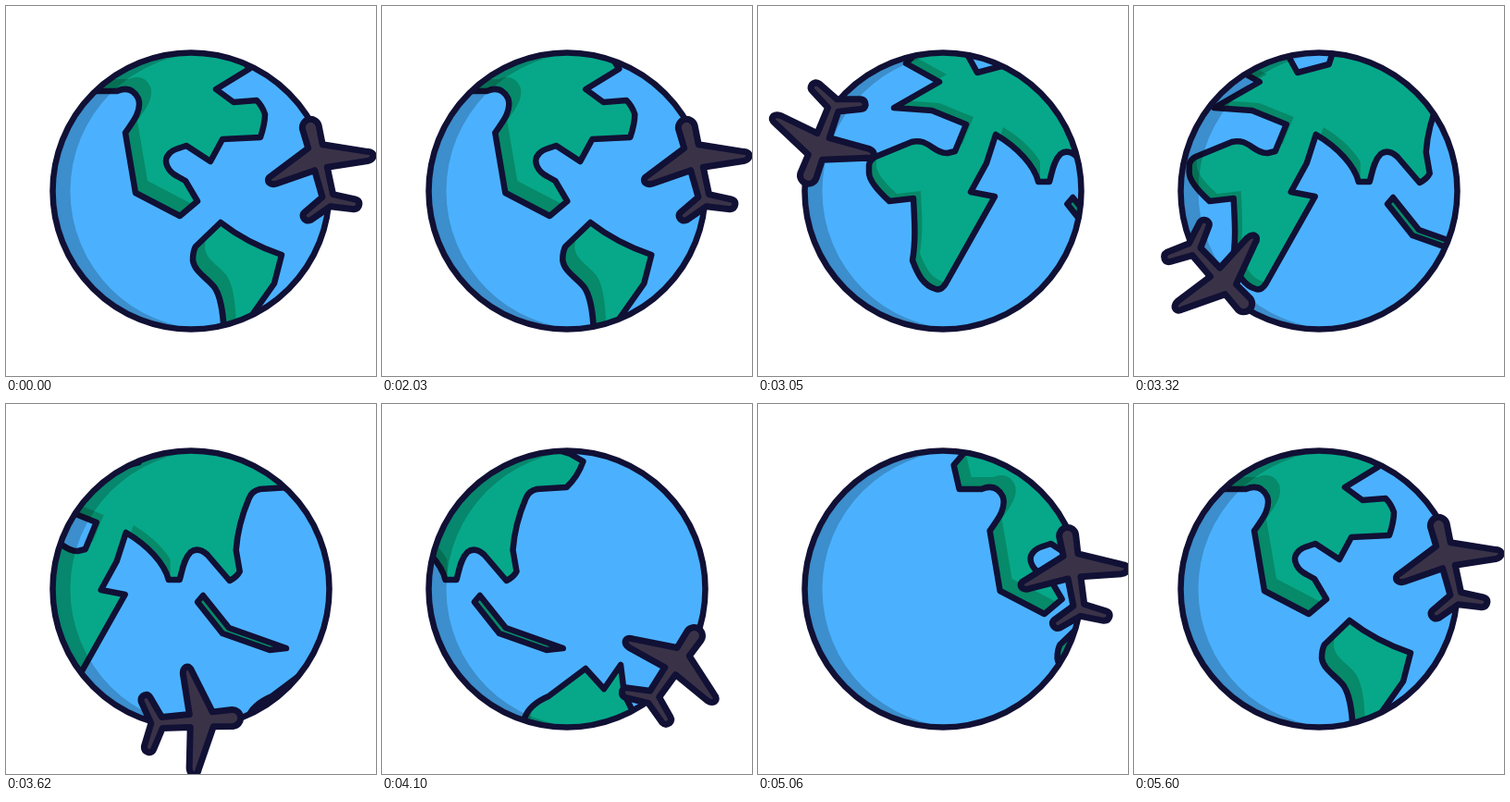
An HTML page with a canvas that plays this animation: 400 px wide and 400 px high, repeating every 5.63 s.

```html
<!DOCTYPE html>
<html lang="en">
<head>
<meta charset="utf-8">
<title>Plane around the globe</title>
<style>
  html, body { margin: 0; width: 100%; height: 100%; overflow: hidden; background: #fff; }
  canvas { display: block; width: 400px; height: 400px; }
</style>
</head>
<body>
<canvas id="stage" width="400" height="400"></canvas>
<script>
const ctx = document.getElementById('stage').getContext('2d');

const LOOP = 5630, REST = 2000, STEP = 30, STEPS = 120;
const SCROLL = 6.7;      // map pixels per step
const MAP_WIDTH = 805;
const C = 200, R = 149.5;
const INK = '#111035', SEA = '#4bb1ff', LAND = '#07a889', LAND_SHADE = '#068a69', PLANE = '#3a3348';

// Each landmass: map offset, shade width, coastline and an optional area without shade.
const lands = [
  { x: 0, shade: 13, lit: 'M165 0 H400 V180 H165 Z',
    coast: `M96 92 L120 92 C132 87 139 92 143 100 C147 112 139 123 129 137 L140 202 L188 227 L207 211
      L194 189 L185 184 C175 179 171 169 174 163 C178 155 187 154 195 151 L221 168 L234 144 L275 142
      C278 133 280 125 280 117 Q277 108 271 102 L246 104 L227 90 L263 68 L256 57 L240 20 L125 20 L102 52 L90 66 Z` },
  { x: 0, shade: 13,
    coast: `M232 234 Q260 256 298 269 L290 300 L240 371 L236 371 C236 340 234 318 226 305
      C218 294 204 288 202 275 Q202 265 205 260 Z` },
  { x: 234.5, shade: 8, lit: 'M305 0 H500 V300 H305 Z',
    coast: `M120 172 Q121 166 127 163 L166 147 C184 142 190 160 205 159 L213 157 L225 128 L188 113 L147 110
      L196 82 L160 62 L172 50 L185 20 L212 20 L226 52 L237 72 L271 63 L285 20 L415 20 L415 47 L438 54 L452 62
      Q446 79 434 90 L402 92 Q393 94 390 102 Q378 130 376 158 L380 181 Q377 187 369 191
      L345 163 Q335 154 327 160 C319 168 318 180 315 190 L303 190 C299 173 281 153 257 139
      L247 170 L230 201 L256 206 L203 300 Q198 308 192 306 C179 302 173 291 167 275 C171 252 169 230 168 208
      L142 211 Q120 191 120 180 Z` },
  { x: 361.8, shade: 8, coast: 'M213 207 L207 214 L234 248 L285 266 L303 264 L241 242 Z' },
  { x: 469, shade: 8,
    coast: 'M148 371 L154 340 Q159 325 180 316 L220 286 L240 308 L258 282 L262 314 L274 338 L270 371 Z' }
].map(({ x, shade, coast, lit }) => ({ x, shade, coast: new Path2D(coast), lit: new Path2D(lit) }));

// Nose up, wings level, origin between the wing tips.
const plane = new Path2D(`M-9 -46 A9 9 0 0 1 9 -46 L8 -25
  L53 -6 Q60 -4 58 1 Q56 4 51 4 L7 0 L6 30 L28 41 Q32 43 31 47 Q29 52 24 51 L0 42
  L-24 51 Q-29 52 -31 47 Q-32 43 -28 41 L-6 30 L-7 0 L-51 4 Q-56 4 -58 1 Q-60 -4 -53 -6 L-8 -25 Z`);

// Cubic bezier easing (1/3, 0, 0.2, 1).
function ease(p) {
  let lo = 0, hi = 1;
  for (let i = 0; i < 30; i++) {
    const t = (lo + hi) / 2, u = 1 - t;
    const x = u * u * t + 0.6 * u * t * t + t * t * t;
    if (x < p) lo = t; else hi = t;
  }
  return lo * lo * (3 - 2 * lo);
}

function disc(x) {
  ctx.beginPath();
  ctx.arc(x, C, R, 0, Math.PI * 2);
}

function drawLand({ coast, lit, shade }, x) {
  ctx.save();
  ctx.translate(x, 0);
  ctx.save();
  ctx.clip(coast);
  ctx.fillStyle = LAND_SHADE;
  ctx.fill(coast);
  ctx.fillStyle = LAND;
  ctx.fill(lit);
  ctx.translate(shade, -shade);
  ctx.fill(coast);
  ctx.restore();
  ctx.stroke(coast);
  ctx.restore();
}

function drawGlobe(scroll) {
  ctx.save();
  disc(C);
  ctx.clip();
  ctx.fillStyle = SEA;
  ctx.fillRect(0, 0, 400, 400);
  for (const land of lands) {
    drawLand(land, land.x - scroll);
    drawLand(land, land.x - scroll + MAP_WIDTH);
  }
  // Crescent shadow along the left limb.
  ctx.beginPath();
  ctx.rect(0, 0, 400, 400);
  ctx.arc(C + 19, C, R, 0, Math.PI * 2);
  ctx.fillStyle = 'rgba(0,0,0,.2)';
  ctx.fill('evenodd');
  ctx.restore();
  disc(C);
  ctx.stroke();
}

function drawPlane(turn) {
  ctx.save();
  ctx.translate(C, C);
  ctx.rotate(-turn * Math.PI * 2);
  ctx.translate(140.5, -24);
  ctx.rotate(-14 * Math.PI / 180);
  ctx.fillStyle = PLANE;
  ctx.fill(plane);
  ctx.lineWidth = 7;
  ctx.stroke(plane);
  ctx.restore();
}

function draw(now) {
  const step = Math.max(0, Math.floor((now % LOOP - REST) / STEP + 1e-6));
  ctx.fillStyle = '#fff';
  ctx.fillRect(0, 0, 400, 400);
  ctx.strokeStyle = INK;
  ctx.lineWidth = 6.5;
  ctx.lineJoin = ctx.lineCap = 'round';
  drawGlobe(step * SCROLL);
  drawPlane(ease(Math.max(0, step - 1) / (STEPS - 1)));
}

let start = null;
function tick(now) {
  if (start === null) start = now;
  draw(now - start);
  requestAnimationFrame(tick);
}
draw(0);
requestAnimationFrame(tick);
</script>
</body>
</html>
```
